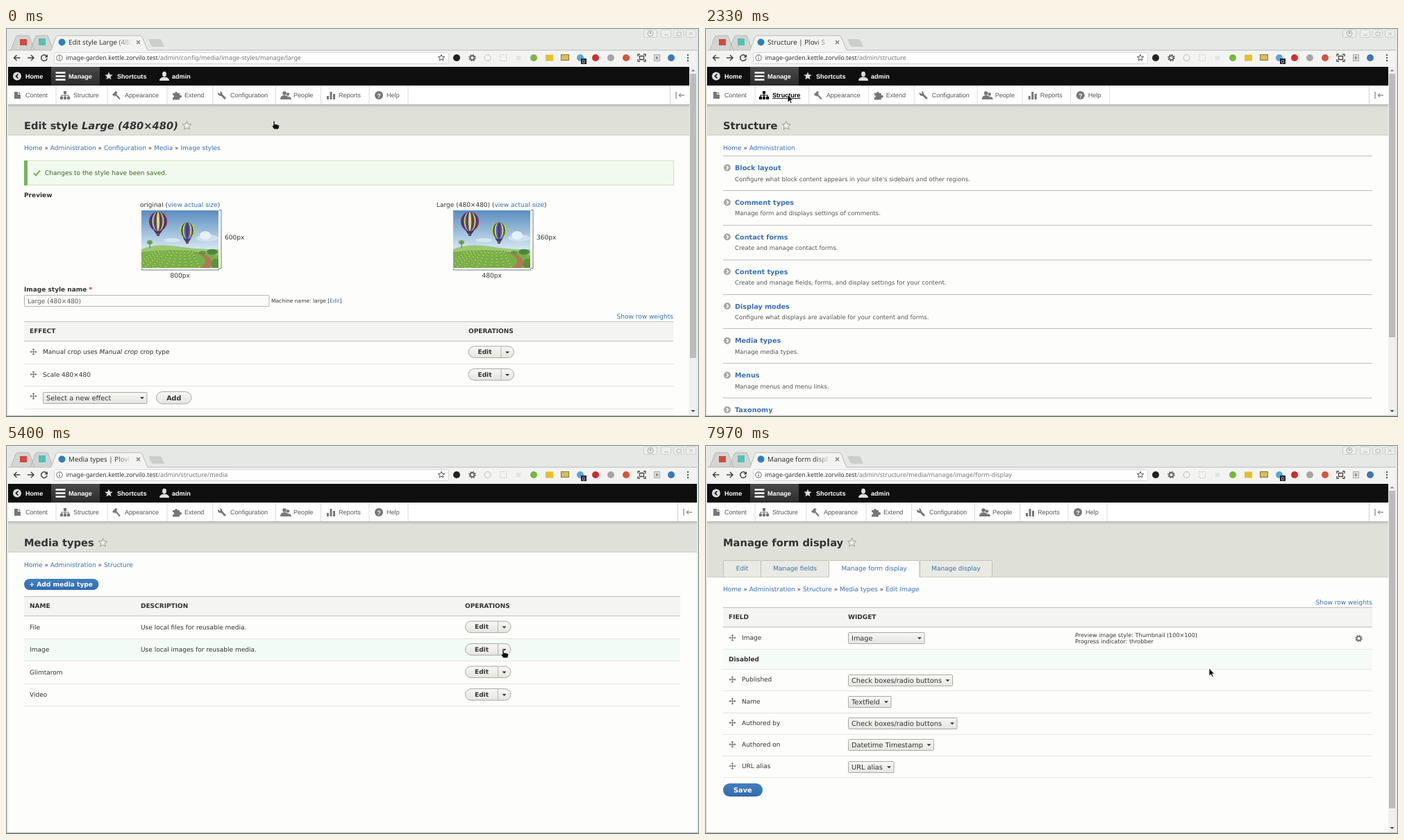
Recreate the animation shown at these times as an HTML page. Size 998x561 px, loop 8 s.

```html
<!DOCTYPE html>
<html lang="en">
<head>
<meta charset="utf-8">
<title>Media settings walkthrough</title>
<style>
  html, body { margin: 0; width: 100%; height: 100%; overflow: hidden; background: #e6e8e6; }
  svg { display: block; width: 998px; height: 561px; }
  text { font: 9px "DejaVu Sans", sans-serif; fill: #333; text-rendering: geometricPrecision; white-space: pre; }
  .bar { font: 9.1px "Liberation Sans", Arial, sans-serif; }
  .ui { font-family: "Noto Sans", sans-serif; }
  .b { font-weight: bold; }
  .i { font-style: italic; }
  .a { fill: #3a70b4; }
  .u { text-decoration: underline; }
  .path { fill: #777; }
  .show { visibility: hidden; animation: 8s step-end infinite; }
  #cursor { animation: move 8s ease-in-out infinite; }
  @keyframes move {
    0%, 1.5% { transform: translate(387px, 135px); }
    10% { transform: translate(146px, 99px); }
    12.9% { transform: translate(137px, 96px); }
    18%, 32% { transform: translate(119px, 96px); }
    42%, 48.75% { transform: translate(82px, 453px); }
    51.5% { transform: translate(400px, 280px); animation-timing-function: linear; }
    53.4% { transform: translate(517px, 305px); animation-timing-function: ease-out; }
    60%, 70% { transform: translate(717px, 296px); }
    74%, 77% { transform: translate(718px, 312px); }
    80.3%, 95.5% { transform: translate(719px, 328px); }
    99%, 100% { transform: translate(726px, 322px); }
  }
</style>
</head>
<body>
<script>
const HOST = 'image-garden.kettle.zorvilo.test';
const LOOP = 8000;
const PAGE = { structure: 1900, media: 3900, form: 7640 };
let keyframes = '';

const rect = (x, y, w, h, fill, more = '') =>
  `<rect x="${x}" y="${y}" width="${w}" height="${h}" fill="${fill}" ${more}/>`;
const box = (x, y, w, h, fill, stroke, r = 0) =>
  rect(x + .5, y + .5, w - 1, h - 1, fill, `stroke="${stroke}" rx="${r}"`);
const line = (d, stroke, width = 1, more = '') =>
  `<path d="${d}" fill="none" stroke="${stroke}" stroke-width="${width}" ${more}/>`;
const shape = (d, fill) => `<path d="${d}" fill="${fill}"/>`;
const disc = (x, y, r, fill, more = '') => `<circle cx="${x}" cy="${y}" r="${r}" fill="${fill}" ${more}/>`;
const oval = (x, y, rx, ry, fill) => `<ellipse cx="${x}" cy="${y}" rx="${rx}" ry="${ry}" fill="${fill}"/>`;
const text = (x, y, content, cls = '', style = '') =>
  `<text x="${x}" y="${y}" class="${cls}" style="${style}">${content}</text>`;
const span = (content, cls) => `<tspan class="${cls}">${content}</tspan>`;
const size = px => `font-size:${px}px`;
const at = (x, y, content) => `<g transform="translate(${x} ${y})">${content}</g>`;
const hline = (x1, x2, y, color) => line(`M${x1} ${y}H${x2}`, color);

// Content that is visible from one time to another, in ms.
function shown(name, from, to, content) {
  const pct = t => (t / LOOP * 100) + '%';
  const end = to < LOOP ? `${pct(to)}{visibility:hidden}` : '';
  keyframes += `@keyframes ${name}{${pct(from)}{visibility:visible}${end}}`;
  return `<g class="show" style="animation-name:${name}">${content}</g>`;
}

function star(x, y, r, fill, stroke) {
  const points = Array.from({ length: 10 }, (_, i) => {
    const a = (i / 5 - .5) * Math.PI, q = i % 2 ? r * .45 : r;
    return `${(x + q * Math.cos(a)).toFixed(2)},${(y + q * Math.sin(a)).toFixed(2)}`;
  });
  return `<polygon points="${points.join(' ')}" fill="${fill}" stroke="${stroke}"/>`;
}

const gear = (x, y, c) =>
  disc(x, y, 3, 'none', `stroke="${c}" stroke-width="2"`) +
  disc(x, y, 4.6, 'none', `stroke="${c}" stroke-width="1.4" stroke-dasharray="1.8 1.81"`);
const caret = (x, y, up) => shape(up ? `M${x - 3} ${y + 1.5}h6l-3-3z` : `M${x - 3} ${y - 1.5}h6l-3 3z`, '#333');
const grip = (x, y) => at(x, y,
  line('M-4 0H4M0-4V4', '#777', 1.2) + shape('M-5 0l2-2v4zM5 0l-2-2v4zM0-5l-2 2h4zM0 5l-2-2h4z', '#777'));

const button = (x, y, w, h, label) =>
  box(x, y, w, h, 'url(#button)', '#a8a8a2', h / 2) +
  text(x + w / 2, y + h / 2 + 3.4, label, 'b', 'text-anchor:middle;' + size(9.6));
const blueButton = (x, y, w, h, label, labelX, px) =>
  rect(x, y, w, h, 'url(#blue)', `rx="${h / 2}"`) + text(labelX, y + h / 2 + 3.3, label, 'b', 'fill:#fff;' + size(px));
const editButton = (x, y) =>
  box(x, y, 66.5, 17.5, 'url(#button)', '#a8a8a2', 8.5) +
  line(`M${x + 47.5} ${y + 1}v15.5`, '#b4b4ae') + text(x + 14, y + 11.6, 'Edit', 'b') + caret(x + 56.5, y + 9.5);
const select = (x, y, w, label) =>
  box(x, y, w, 17, 'url(#button)', '#aaaaa4', 1) +
  text(x + 5, y + 11.7, label, '', size(9.75)) + caret(x + w - 7.5, y + 8.7);

const tableHead = (y, right, labels) =>
  rect(26, y, right - 26, 28.5, '#f4f5f2') + hline(26, right, y + .5, '#bfc1bd') + hline(26, right, y + 28.5, '#bfc1bd') +
  labels.map(([x, label]) => text(x, y + 17.2, label, 'b')).join('');
const rowLines = (right, ys) => ys.map(y => hline(26, right, y, '#e4e5df')).join('');
const crumbs = (y, names) => text(26, y, names.map(n => span(n, 'a')).join(' » '));
const weights = y => text(961, y, 'Show row weights', 'a', 'text-anchor:end');

const trayIcons = [
  shape('M-4-5h5v4h4v6h-9zM2-5l3 3h-3z', 'currentColor'),
  shape('M-2-6h4v4h-4zM-7 2h4v4h-4zM-2 2h4v4h-4zM3 2h4v4h-4z', 'currentColor') + line('M0-2V3M-5 3V0H5V3', 'currentColor', 1.2),
  shape('M-6-1l5-5 3 2-2 1 1 2-3 3-1-2-1 1z', 'currentColor') + line('M0 0L5 5.5', 'currentColor', 2),
  shape('M-6-3h3a2 2 0 1 1 4 0h3v3a2 2 0 1 1 0 3.5v3h-10v-3a2 2 0 0 0 0-4z', 'currentColor'),
  line('M-1-1L5 5', 'currentColor', 3) + shape('M-6-4l3 2 1-1-1-3a4 4 0 0 1 3 6l-2 1a4 4 0 0 1-4-5z', 'currentColor'),
  disc(-1, -3, 2.8, 'currentColor') + shape('M-7 6q0-6 6-6t6 6z', 'currentColor') +
    disc(4, -1.5, 2.2, 'currentColor') + shape('M4 2q5 0 5 4h-4z', 'currentColor'),
  shape('M-6 1h3v5h-3zM-1.5-5h3v11h-3zM3-2h3v8h-3z', 'currentColor'),
  disc(0, 0, 6, 'currentColor') + text(-2.8, 3.5, '?', 'bar b', 'fill:#fff'),
];
const trayItems = [['Content', 16, 28], ['Structure', 85, 97], ['Appearance', 159, 171], ['Extend', 246, 257],
  ['Configuration', 311, 323], ['People', 402, 414], ['Reports', 468, 479], ['Help', 537, 548]];
const trayEdges = [72, 146, 232, 297.5, 388.5, 453.5, 523, 579];

function tray(active, right) {
  const wider = active ? 3.7 : 0; // the bold active label pushes the rest along
  const items = trayItems.map(([label, iconX, x], i) => {
    const on = active && i === 1, shift = i > 1 ? wider : 0;
    return `<g color="${on ? '#000' : '#777'}">${at(iconX + shift, 97, trayIcons[i])}</g>` +
      text(x + shift, 100.2, label, 'bar' + (on ? ' b u' : ''), `fill:${on ? '#000' : '#565656'}`);
  });
  const edges = trayEdges.map((x, i) => line(`M${x + (i ? wider : 0)} 83V110`, '#dcdcd8'));
  return rect(3, 83, right - 3, 27, '#fff') + hline(3, right, 110.5, '#b9b9b4') + items.join('') + edges.join('') +
    line(`M${right - 27.5} 83V110`, '#d0d0cc') +
    line(`M${right - 19} 92v10m4-5h8m-8 0l3-2.5m-3 2.5l3 2.5`, '#999', 1.5);
}

function toolbar(right) {
  const white = (x, label) => text(x, 72.8, label, 'bar b', 'fill:#fff');
  return rect(3, 56, right - 3, 27, '#0f0f0f') + rect(65, 56, 70, 27, 'url(#tab)') +
    disc(16, 69.5, 6, '#ddd') + line('M17.5 66.5l-3 3 3 3', '#111', 1.7) + white(28, 'Home') +
    line('M71.5 64.5h14m-14 5h14m-14 5h14', '#fff', 2.4) + white(90, 'Manage') +
    star(148, 69.5, 6, '#ddd', 'none') + white(160, 'Shortcuts') +
    oval(228, 66.5, 3, 3.8, '#ddd') + shape('M221 76q0-5 7-5.5q7 .5 7 5.5z', '#ddd') + white(239, 'admin');
}

function scrollbar(end) {
  return rect(984, 56, 11, 502, '#f0f0ee') + rect(985, 66, 9, end - 66, '#bcbdbb') +
    shape('M986.5 62.5h6l-3-3z', '#888') + shape('M986.5 551h6l-3 3z', '#444');
}

function page({ title, path, heading, starX, thumb, active, headEnd = 154, body }) {
  const right = thumb ? 984 : 995;
  return text(90, 24, title, 'ui', size(9.8)) + rect(158, 14, 24, 14, 'url(#fade)') +
    text(86, 46.4, HOST + span(path, 'path'), 'ui', size(8.9)) +
    rect(3, 56, 992, 502, '#fdfdfb') + toolbar(right) + tray(active, right) +
    rect(3, 111, right - 3, headEnd - 111, '#dfe0d8') + rect(3, 111, right - 3, 4, 'url(#shade)') +
    hline(3, right, headEnd + .5, '#cfd0c6') +
    text(26, 146.2, heading, 'b', size(14.67)) + star(starX, 141, 6.5, '#eeeee8', '#9b9b93') +
    body + (thumb ? scrollbar(thumb) : '');
}

const status = path =>
  rect(3, 540, 329.5, 18, '#e3e4df') + text(5.5, 552.6, HOST + path, 'ui', 'fill:#777;' + size(9.45));

const balloon = (x, y, rx, ry, colors) =>
  shape(`M${x - rx * .8} ${y + ry * .5}L${x - 2} ${y + ry + 5}h4L${x + rx * .8} ${y + ry * .5}z`, colors[1]) +
  colors.map((c, i) => oval(x, y, rx * (1 - i / colors.length), ry, c)).join('') +
  rect(x - 2, y + ry + 3, 4, 4, '#6b5138');

function picture() {
  let vines = '';
  for (let i = 0; i < 11; i++) vines += `M${22 + i * 5} 58L${i * 10 - 16} 83`;
  return `<g clip-path="url(#frame)">` + rect(0, 0, 111, 83, 'url(#sky)') +
    oval(95, 40, 16, 5, '#cfe1ef') + oval(92, 36, 8, 6, '#e6f0f7') + oval(44, 43, 12, 3, '#d3e5f1') +
    shape('M0 56Q22 47 52 52T111 56V83H0z', '#9cc774') + shape('M0 60Q58 53 111 65V83H0z', '#79b04a') +
    line(vines, '#a9c95c', 1.8) + line(vines, '#56913a', 1.4, 'stroke-dasharray="2 2.5"') +
    shape('M76 61Q92 62 98 68Q104 76 98 83H84Q96 75 90 68Q86 63 76 61z', '#b47655') +
    oval(102, 60, 8, 4, '#4d8839') + oval(88, 61, 5, 2.5, '#5f9640') + oval(107, 77, 7, 7, '#5c9238') +
    oval(12, 46, 4, 3, '#6ca348') + line('M12 46v8', '#59733a') +
    balloon(24, 16, 13, 14, ['#8c2b52', '#4c2f7c', '#c4d94c', '#3e4da6', '#6b2f7a', '#d9df55']) +
    balloon(66, 29, 11, 12, ['#b2d840', '#3f3c8e', '#c9de4d', '#4565b8', '#5d3584']) + '</g>';
}

const preview = (x, name, nameX, height, width) =>
  text(nameX, 258.3, `${name} (${span('view actual size', 'a')})`) + at(x, 263, picture()) +
  line(`M${x + 112} 262.5h3v84h-3M${x + .5} 347v2h111v-2`, '#777') +
  text(x + 120, 304.8, height) + text(x + 41.5, 360.2, width);

const stylePage = page({
  title: 'Edit style Large (480', path: '/admin/config/media/image-styles/manage/large', thumb: 476,
  heading: 'Edit style ' + span('Large (480×480)', 'i'), starX: 260.5,
  body: crumbs(176, ['Home', 'Administration', 'Configuration', 'Media', 'Image styles']) +
    box(26, 191, 936, 36, '#f2f9ee', '#cfe2c6') + rect(26, 191, 5, 36, '#79b45d') +
    line('M40 209.5l3 3 6-7', '#73b355', 2) + text(56, 212, 'Changes to the style have been saved.', '', 'fill:#38642a') +
    text(26, 243.6, 'Preview', 'b') +
    preview(195, 'original', 193, '600px', '800px') + preview(644, 'Large (480×480)', 620, '360px', '480px') +
    text(26, 380, 'Image style name <tspan fill="#e02020">*</tspan>', 'b') +
    box(26, 385, 353.5, 17, '#fcfcfa', '#b5b6b0', 1) + text(31, 397, 'Large (480×480)', '', 'fill:#595959') +
    text(382, 396.3, `Machine name: large [${span('Edit', 'a')}]`, '', size(7.5)) + weights(418.7) +
    tableHead(423, 961, [[34, 'EFFECT'], [666, 'OPERATIONS']]) + rowLines(961, [484.5, 516.5, 549.5]) +
    [467, 499.5, 531].map(y => grip(39.5, y)).join('') +
    text(53, 470, `Manual crop uses ${span('Manual crop', 'i')} crop type`) + text(53, 502.7, 'Scale 480×480') +
    editButton(665.5, 458.5) + editButton(665.5, 491) +
    select(53, 525, 150.5, 'Select a new effect') + button(216, 524, 51.5, 18.5, 'Add'),
});

const sections = [
  ['Block layout', "Configure what block content appears in your site's sidebars and other regions."],
  ['Comment types', 'Manage form and displays settings of comments.'],
  ['Contact forms', 'Create and manage contact forms.'],
  ['Content types', 'Create and manage fields, forms, and display settings for your content.'],
  ['Display modes', 'Configure what displays are available for your content and forms.'],
  ['Media types', 'Manage media types.'],
  ['Menus', 'Manage menus and menu links.'],
  ['Taxonomy', ''],
];
const sectionY = i => 205.1 + i * 49.86;

const structurePage = page({
  title: 'Structure | Plovi S', path: '/admin/structure', thumb: 446, active: true, heading: 'Structure', starX: 117,
  body: crumbs(176, ['Home', 'Administration']) + sections.map(([name, about], i) => {
    const y = sectionY(i);
    return hline(26, 961, Math.round(y - 21) + .5, '#bdbeb8') + disc(32, y - 3.5, 5, '#a9aaa6') +
      line(`M31 ${y - 6}l2.5 2.5-2.5 2.5`, '#fff', 1.5) +
      text(43, y, name, 'b a', size(9.65)) + text(43, y + 15.5, about, '', 'fill:#555;' + size(8.5));
  }).join(''),
});

const mediaRows = [['File', 'Use local files for reusable media.'], ['Image', 'Use local images for reusable media.'], ['Glimtarom', ''], ['Video', '']];
const rowTint = i => rect(26, 247 + i * 32.5, 945, 32, '#f3fbf6');
const operations = ['Edit', 'Manage fields', 'Manage form display', 'Manage display', 'Delete'];
const operation = (i, color) => text(675, 298 + i * 16.6, operations[i], 'b', `fill:${color}`);

const menu = box(661, 286.5, 153, 83.5, '#efefea', '#a2a39d', 8) + line('M795.5 287V369.5', '#adaea8') +
  [1, 2, 3, 4].map(i => hline(662, 795, Math.round(286.5 + i * 16.6) + .5, '#b9bab3')).join('') +
  operations.map((_, i) => operation(i, '#333')).join('') + caret(804, 296, true);

const mediaPage = page({
  title: 'Media types | Plovi', path: '/admin/structure/media', heading: 'Media types', starX: 139.5,
  body: crumbs(176, ['Home', 'Administration', 'Structure']) +
    blueButton(26, 193, 107.5, 16, '+ Add media type', 33.5, 9.1) +
    shown('hoverFile', 4080, 4330, rowTint(0)) + shown('hoverImage', 4330, PAGE.form, rowTint(1)) +
    tableHead(218, 971, [[34, 'NAME'], [194, 'DESCRIPTION'], [661, 'OPERATIONS']]) +
    rowLines(971, [279.5, 311.5, 344.5, 376.5]) +
    mediaRows.map(([name, about], i) => {
      const y = 265.6 + i * 32.5;
      return text(34, y, name) + text(194, y, about) + editButton(661, y - 12);
    }).join('') +
    shown('menu', 5440, PAGE.form, menu) +
    shown('hoverFields', 5900, 6480, operation(1, '#000')) + shown('hoverForm', 6480, PAGE.form, operation(2, '#000')),
});

const localTab = (x, w, label, on) =>
  box(x, 166, w, 25, on ? '#fdfdfb' : '#e9eae3', '#bfc0b6', 2) +
  (on ? rect(x + 1, 189, w - 2, 3, '#fdfdfb') : hline(x, x + w, 190.5, '#cfd0c6')) +
  text(x + w / 2, 181, label, 'a', 'text-anchor:middle');
const fields = [['Published', 'Check boxes/radio buttons', 151], ['Name', 'Textfield', 62.5], ['Authored by', 'Check boxes/radio buttons', 157.5],
  ['Authored on', 'Datetime Timestamp', 124], ['URL alias', 'URL alias', 66.5]];

const formPage = page({
  title: 'Manage form displ', path: '/admin/structure/media/manage/image/form-display', thumb: 524,
  heading: 'Manage form display', starX: 211.5, headEnd: 190,
  body: localTab(26, 55, 'Edit') + localTab(80, 99, 'Manage fields') + localTab(309, 105, 'Manage display') +
    localTab(178, 131.5, 'Manage form display', true) +
    crumbs(211.4, ['Home', 'Administration', 'Structure', 'Media types', 'Edit ' + span('Image', 'i')]) + weights(229.6) +
    tableHead(234, 961, [[34, 'FIELD'], [206, 'WIDGET']]) + rect(26, 295, 935, 29, '#f5fcf8') +
    rowLines(961, [294.5, 323.5, 354.5, 386.5, 417.5, 448.5, 479.5]) +
    grip(39.5, 278) + text(53, 281, 'Image') + select(206, 270, 110.5, 'Image') +
    text(533, 277, 'Preview image style: Thumbnail (100×100)', '', size(8.1)) +
    text(533, 286, 'Progress indicator: throbber', '', size(8.1)) + gear(941.5, 279, '#777') +
    text(34, 312, 'Disabled', 'b') +
    fields.map(([name, widget, w], i) => {
      const y = 338.2 + i * 31.2;
      return grip(39.5, y) + text(53, y + 3.2, name) + select(206, Math.round(y - 7.5), w, widget);
    }).join('') +
    blueButton(26, 488, 57, 19, 'Save', 41, 9.8),
});

function extensions() {
  const plain = [[649, '#222'], [760, '#78b73b'], [827, '#5aa7d6'], [849, '#d02b2b'], [871, '#a5a7a5'], [893, '#d9533a'], [958, '#3b78b8']];
  const dashed = 'stroke="#c4c6c4" stroke-dasharray="2 2"';
  return plain.map(([x, c]) => disc(x, 43, 5, c)).join('') + gear(671.5, 43, '#666') +
    disc(693.5, 43, 4.5, 'none', 'stroke="#bbb"') + rect(711.5, 38.5, 9, 9, 'none', dashed) +
    rect(735, 40, 6, 6, '#e3e4e2') + rect(777, 38.5, 11, 9, '#e9bd2f') + rect(799.5, 38.5, 11, 8, '#d6bb60', 'stroke="#8d7528"') +
    rect(828, 44, 8, 8, '#223') + text(830, 50.5, '0', 'bar', 'fill:#fff;' + size(7)) +
    line('M910 41v-3h3m5 0h3v3m0 4v3h-3m-5 0h-3v-3M912.5 40.5h6v5h-6z', '#444', 1.3) +
    box(933, 38, 9, 10, '#dcdedc', '#aaa') + shape('M936 40.5l4 2.5-4 2.5z', '#888') +
    [39, 43, 47].map(y => disc(982, y, 1.2, '#555')).join('');
}

const windowFrame = rect(0, 0, 998, 561, '#e6e8e6') +
  shape('M7 32L14 13Q15 11 17 11H33L41 32zM35 32L42 13Q43 11 45 11H60L68 32z', '#d2d5d2') +
  line('M7 32L14 13Q15 11 17 11H33L41 32M35 32L42 13Q43 11 45 11H60L68 32', '#b4b8b5') +
  shape('M205 16H221Q223 16 224 18L228 27H212Q210 27 209 25z', '#cbcecb') +
  rect(3, 32, 992, 24, '#f3f4f2') + shape('M65 33L72 13Q73 11 75 11H193Q195 11 196 13L204 33z', '#f3f4f2') +
  line('M3 32H65L72 13Q73 11 75 11H193Q195 11 196 13L204 32H995', '#b9bcb9') +
  rect(20, 16, 10, 9, '#d5483e') + rect(47, 15, 10, 10, '#58bfb5') + disc(80.5, 20.5, 5, '#2c7fc0') +
  line('M188 18l5 5m0-5l-5 5', '#777', 1.2) +
  line('M20.5 43h-9m4-4l-4 4 4 4', '#444', 1.5) + line('M31 43h9m-4-4l4 4-4 4', '#444', 1.5) +
  line('M58.5 40.5a4.3 4.3 0 1 0 .7 3.5', '#444', 1.5) + shape('M60 38v4.5h-4.5z', '#444') +
  box(69, 35, 569, 17, '#fefefe', '#d6d8d5', 2) +
  disc(77, 43, 4.2, 'none', 'stroke="#666"') + line('M77 42.5v3M77 40v1.2', '#666', 1.2) +
  star(627, 43, 4.8, 'none', '#555') + extensions() +
  [[918, 20], [943, 15], [961, 15], [979, 15]].map(([x, w]) => box(x, 2, w, 12, '#eceeec', '#cbcecb', 2)).join('') +
  disc(928, 8, 4, 'none', 'stroke="#aaa"') + disc(928, 7, 1.5, '#aaa') +
  line('M948 10h6M966 6h6v5h-6zM984 5.5l5 5m0-5l-5 5', '#b4b7b4') +
  line('M.5 561V.5H997.5V561', '#78898a') + rect(0, 559.5, 998, 1.5, '#62706f');

const gradient = (id, from, to, more = 'x2="0" y2="1"', alpha = 1, endAlpha = 1) =>
  `<linearGradient id="${id}" ${more}><stop stop-color="${from}" stop-opacity="${alpha}"/>` +
  `<stop offset="1" stop-color="${to}" stop-opacity="${endAlpha}"/></linearGradient>`;
const defs = '<defs>' + gradient('button', '#f7f7f4', '#e6e6df') + gradient('blue', '#437fbd', '#316bad') +
  gradient('tab', '#4a4a4a', '#2b2b2b') + gradient('sky', '#5a8dc0', '#d9eaf3', 'x2="0" y2=".7"') +
  gradient('shade', '#777', '#777', 'x2="0" y2="1"', .3, 0) + gradient('fade', '#f3f4f2', '#f3f4f2', '', 0, 1) +
  '<clipPath id="frame"><rect width="111" height="83"/></clipPath></defs>';

const arrow = shape('M0 0V11L2.6 8.7 4.3 12.5 6 11.7 4.4 8H7.5z', '#111');
const hand = shape('M-2-1Q-.5-2 0 0V3.5L5 4.5Q7 5 6.5 7L5.5 11H-1L-4 6.5Q-3.5 5-2 6z', '#111');
const cursor = '<g id="cursor" stroke="#fff" stroke-width=".6">' +
  [['hand1', 0, 110, hand], ['arrow1', 110, 720, arrow], ['hand2', 720, PAGE.structure, hand],
    ['arrow2', PAGE.structure, 3340, arrow], ['hand3', 3340, PAGE.media, hand], ['arrow3', PAGE.media, 4760, arrow],
    ['hand4', 4760, PAGE.form, hand], ['arrow4', PAGE.form, LOOP, arrow]]
    .map(part => shown(...part)).join('') + '</g>';

const scene = defs + windowFrame +
  shown('stylePage', 0, PAGE.structure, stylePage) +
  shown('structurePage', PAGE.structure, PAGE.media, structurePage) +
  shown('mediaPage', PAGE.media, PAGE.form, mediaPage) +
  shown('formPage', PAGE.form, LOOP, formPage) +
  shown('hoverStructure', 720, PAGE.structure, text(97, 100.2, 'Structure', 'bar u', 'fill:#000')) +
  shown('hoverMedia', 3360, PAGE.media, text(43, sectionY(5), 'Media types', 'b a u', size(9.65))) +
  shown('statusStructure', 800, PAGE.structure, status('/admin/structure')) +
  shown('statusMedia', 3480, PAGE.media, status('/admin/structure/media')) +
  shown('statusForm', 6360, PAGE.form, status('/admin/structure/media/…/form-display')) + cursor;

document.body.innerHTML = `<style>${keyframes}</style><svg viewBox="0 0 998 561">${scene}</svg>`;
</script>
</body>
</html>
```
